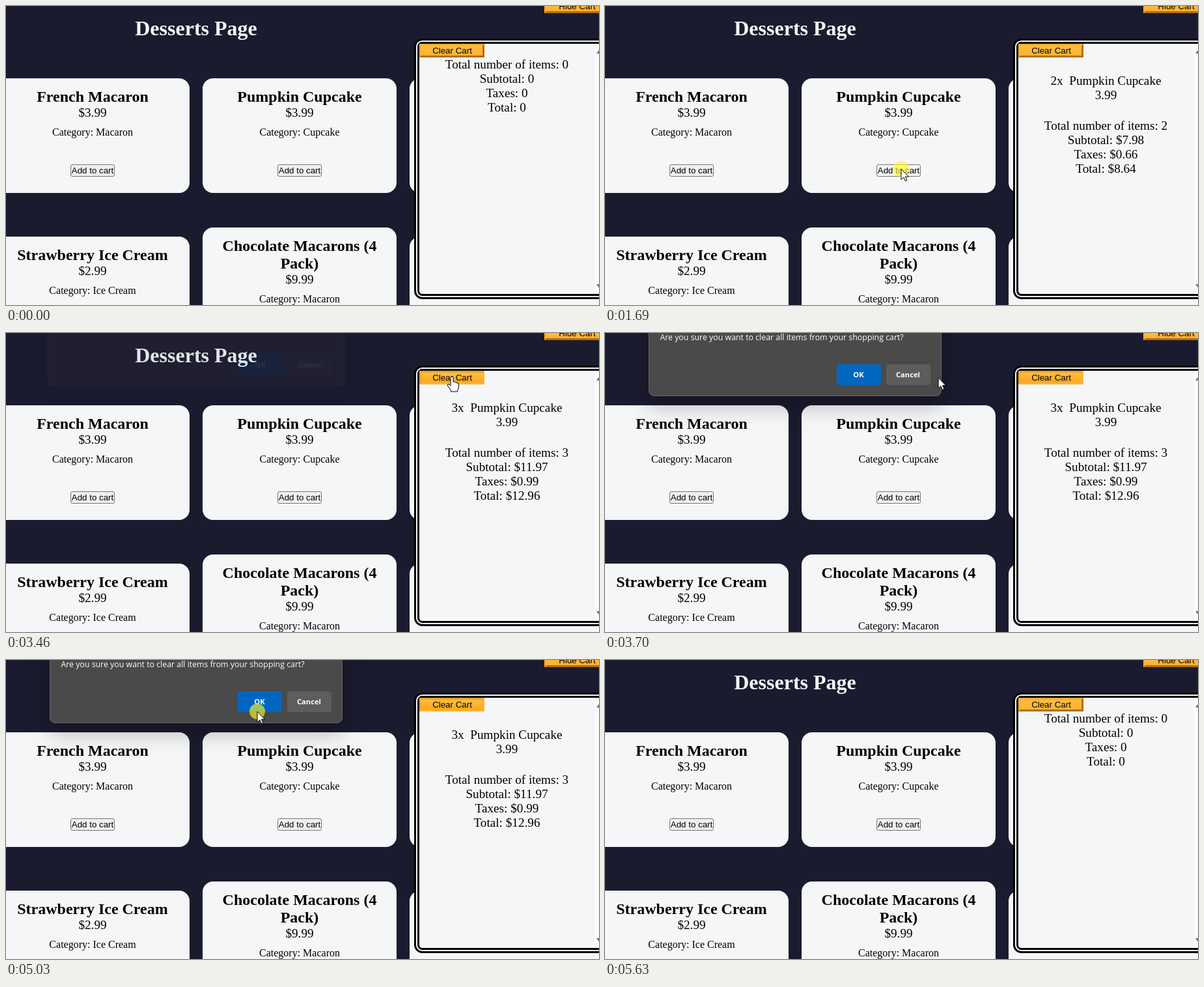
Write an HTML page that moves like this. It is 911x459 px and loops after 7300 ms.

```html
<!DOCTYPE html>
<html lang="en">
<head>
<meta charset="utf-8">
<title>Desserts cart</title>
<style>
  html, body { margin: 0; width: 100%; height: 100%; overflow: hidden; background: #1b1b2f; }
  svg { display: block; width: 100vw; height: 100vh; }
  text { font-family: "Liberation Serif", "Times New Roman", serif; text-anchor: middle; }
  .h1 { font-size: 32px; font-weight: bold; fill: #f5f6f8; }
  .h2 { font-size: 24px; font-weight: bold; }
  .big { font-size: 19.2px; }
  .small { font-size: 16px; }
  .btn { font: 13.333px "Liberation Sans", Arial, sans-serif; }
  .ui { font: 12.37px "Open Sans", "Noto Sans", sans-serif; fill: #fff; }
  .uib { font: 700 11.2px "Open Sans", "Noto Sans", sans-serif; fill: #fff; }
  .card { fill: #f5f6f8; }
  .box { filter: drop-shadow(0 14px 17px rgba(0, 0, 0, .26)); }
</style>
</head>
<body>
<svg viewBox="0 0 911 459" preserveAspectRatio="none">
  <defs>
    <linearGradient id="idle" x2="0" y2="1">
      <stop offset="0" stop-color="#ffbf47"/><stop offset="1" stop-color="#ffb02e"/>
    </linearGradient>
    <linearGradient id="held" x2="0" y2="1">
      <stop offset="0" stop-color="#ffc64e"/><stop offset="1" stop-color="#ff9f10"/>
    </linearGradient>
  </defs>
  <g id="page"></g>
  <g id="panel"></g>
  <g id="cart"></g>
  <g id="dialog"></g>
  <circle id="spot" r="12" fill="#fff528" fill-opacity=".65"/>
  <path id="arrow" d="M0 0V16.5L3.8 13 6.4 18.8 8.9 17.7 6.4 12H11.5Z" fill="#fff" stroke="#000"/>
  <path id="hand" fill="#fff" stroke="#000" d="M-2 1.5Q-2 0 0 0Q2 0 2 1.5V8Q5 7 5.5 9Q8 8 8 10Q10.5 9.5 10.5 12V16Q10.5 19 8.5 21V23H-1.5V21L-6.5 14Q-7 11.5-5 11.5L-2 14Z"/>
</svg>
<script>
const $ = id => document.getElementById(id);

function add(parent, tag, attrs, text) {
  const el = document.createElementNS("http://www.w3.org/2000/svg", tag);
  for (const k in attrs) el.setAttribute(k, attrs[k]);
  if (text) el.textContent = text;
  return parent.appendChild(el);
}
const label = (parent, cls, x, y, text) => add(parent, "text", { class: cls, x, y }, text);
const rect = (parent, x, y, width, height, rx, more) =>
  add(parent, "rect", { x, y, width, height, rx, ...more });

// Page
const page = $("page");

// Returns the button of the card
function card(x, y, title, price, category) {
  const mid = x + 149, lines = title.split("\n"), drop = (lines.length - 1) * 27;
  rect(page, x, y, 298, 176 + drop, 16, { class: "card" });
  lines.forEach((s, i) => label(page, "h2", mid, y + 36 + i * 27, s));
  label(page, "big", mid, y + 59 + drop, price);
  label(page, "small", mid, y + 88 + drop, "Category: " + category);
  const button = rect(page, mid - 33.5, y + 132.5 + drop, 67, 18, 2.5, { fill: "#efefef", stroke: "#767676" });
  label(page, "btn", mid, y + 146 + drop, "Add to cart");
  return button;
}

label(page, "h1", 292, 45, "Desserts Page");
card(-16, 111, "French Macaron", "$3.99", "Macaron");
const addButton = card(302, 111, "Pumpkin Cupcake", "$3.99", "Cupcake");
card(-16, 354, "Strawberry Ice Cream", "$2.99", "Ice Cream");
card(302, 340, "Chocolate Macarons (4\nPack)", "$9.99", "Macaron");
for (const y of [111, 354]) rect(page, 620, y, 298, 176, 16, { class: "card" });

// Cart panel
const panel = $("panel");

function bevel(x, y, text) {
  const g = add(panel, "g", { transform: `translate(${x} ${y})` });
  const face = rect(g, 0, 0, 100, 21, 0);
  const lit = add(g, "path", { d: "M0 21V0H100L97 3H3V18Z" });
  const dark = add(g, "path", { d: "M0 21H100V0L97 3V18H3Z" });
  label(g, "btn", 50.5, 15, text);
  return held => {
    face.setAttribute("fill", held ? "url(#held)" : "url(#idle)");
    lit.setAttribute("fill", held ? "#efa52c" : "#ffae33");
    dark.setAttribute("fill", held ? "#ffb438" : "#b56d16");
  };
}

const frame = { fill: "#f5f6f8", stroke: "#000", "stroke-width": 3 };
rect(panel, 628.5, 51.5, 320, 397, 11, frame);
rect(panel, 633.5, 56.5, 320, 387, 6, frame);
rect(panel, 904, 58, 10, 384, 0, { fill: "#fbfbfc" });
add(panel, "path", { d: "M907 73L912 66 917 73ZM907 427L912 434 917 427Z", fill: "#67758a" });
bevel(827, -10, "Hide Cart")(false);
const clearLook = bevel(635, 58, "Clear Cart");

// One layer for each number of cupcakes
const carts = [0, 1, 2, 3].map(n => {
  const g = add($("cart"), "g", {});
  const sub = n * 3.99, tax = sub * 0.0825;
  const money = v => n ? "$" + v.toFixed(2) : "0";
  if (n) {
    label(g, "big", 769.5, 121, n + "x\u00a0 Pumpkin Cupcake");
    label(g, "big", 769.5, 143, "3.99");
  }
  ["Total number of items: " + n, "Subtotal: " + money(sub), "Taxes: " + money(tax), "Total: " + money(sub + tax)]
    .forEach((s, i) => label(g, "big", 769.5, (n ? 190 : 96) + i * 22, s));
  return g;
});

// Confirm dialog
const dialog = $("dialog");
rect(dialog, 67.5, -60, 449, 156.5, 8, { class: "box", fill: "#4a4a4a", stroke: "#666" });
label(dialog, "ui", 271.5, 11, "Are you sure you want to clear all items from your shopping cart?");
rect(dialog, 356, 48, 68, 32, 4, { fill: "#0067c0" });
rect(dialog, 432, 48, 68, 32, 4, { fill: "#5d5d5d" });
label(dialog, "uib", 389.5, 68, "OK");
label(dialog, "uib", 465.5, 68, "Cancel");

const LOOP = 7300, TICK = 84.03;
const HOLD = 2, ENTER = 1, LEAVE = 67;
const addClick = n => 8 + 6 * n, CLEAR = 39, CONFIRM = 59;
const clicks = [0, 1, 2].map(addClick).concat(CLEAR, CONFIRM);

// Pointer glides: cubic curves, each starting where the last one ended
const glides = [];
let tip = [684, 414];
function glide(from, to, c1, c2, end) {
  glides.push({ from, to, curve: [tip, c1, c2, end] });
  tip = end;
}
glide(ENTER, 5, [600, 360], [500, 280], [455, 250]);
glide(24, 33, [520, 290], [703, 230], [702, 27]);
glide(33, CLEAR, [608, 20], [608, 70], [685, 67]);
glide(42, 51, [560, 72], [300, 70], [262, 38]);
glide(51, 58, [262, 22], [283, 39], [386, 79]);
glide(62, 66, [400, 130], [520, 300], [610, 428]);

function pointerAt(k) {
  const { from, to, curve: [a, b, c, d] } = glides.findLast(g => g.from <= k);
  const u = (1 - Math.min(1, (k - from) / (to - from))) ** 1.8, t = 1 - u;
  return a.map((v, i) => u ** 3 * v + 3 * t * u * (u * b[i] + t * c[i]) + t ** 3 * d[i]);
}

const show = (el, on) => el.setAttribute("visibility", on ? "visible" : "hidden");
const inside = (x, y, l, t, r, b) => x >= l && x < r && y >= t && y < b;
const clamp = v => Math.max(0, Math.min(1, v));

function draw(k) {
  const live = k >= ENTER && k < LEAVE;
  const [x, y] = live ? pointerAt(k) : [-99, -99];
  const down = clicks.some(c => k >= c && k < c + HOLD);
  const over = inside(x, y, 635, 58, 735, 79);
  const onAdd = inside(x, y, 417, 243, 485, 262);
  const cleared = k >= CONFIRM + HOLD;

  const count = cleared ? 0 : [0, 1, 2].filter(n => k >= addClick(n) + HOLD).length;
  carts.forEach((g, n) => show(g, n === count));
  addButton.setAttribute("fill", onAdd ? (down ? "#f5f5f5" : "#e5e5e5") : "#efefef");
  clearLook(over || (k >= CLEAR && !cleared));

  // The dialog drops in as it fades, and leaves the same way
  const seen = clamp(.46 * Math.min(k - CLEAR - 1.8, CONFIRM + 4.3 - k));
  const away = (1 - seen) ** .7;
  dialog.setAttribute("opacity", seen);
  dialog.setAttribute("transform",
    `translate(292 ${97 - 15.5 * away}) scale(${1 + .0155 * away}) translate(-292 -97)`);

  for (const id of ["spot", "arrow", "hand"]) $(id).setAttribute("transform", `translate(${x} ${y})`);
  show($("spot"), down);
  show($("hand"), over);
  show($("arrow"), live && !over);
}

let last = -1;
function loop() {
  const k = Math.floor(performance.now() % LOOP / TICK + .15);
  if (k !== last) draw(last = k);
  requestAnimationFrame(loop);
}
loop();
</script>
</body>
</html>
```
